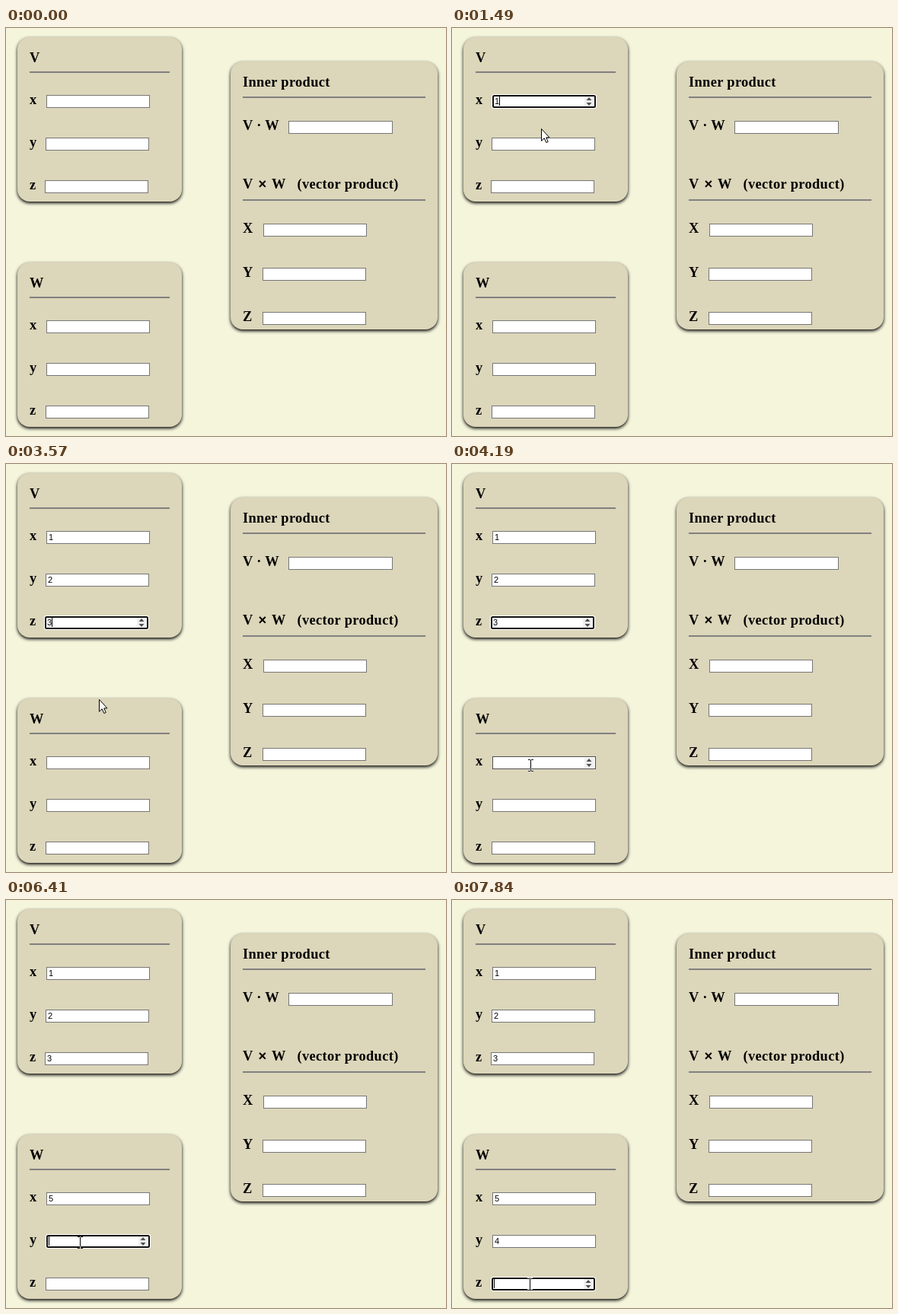
Animation of 578 by 536 pixels, one loop 8000 ms. Source, as an HTML page:

```html
<!DOCTYPE html>
<html lang="en">
<head>
<meta charset="utf-8">
<title>Vector products</title>
<style>
html, body { margin: 0; width: 100%; height: 100%; overflow: hidden; background: #f5f5dc; }
.card { position: absolute; left: 15px; width: 216px; height: 216px; border-radius: 16px;
  background: #dcd6ba; box-shadow: 0 2px 4px #000; }
svg { position: absolute; left: 0; top: 0; }
#labels { font: bold 18.4px "Liberation Serif", "Times New Roman", serif; letter-spacing: .35px; }
#labels .times { font-family: "Liberation Sans", Arial, sans-serif; }
#fields { font: 11px "Liberation Sans", Arial, sans-serif; }
#beam { mix-blend-mode: difference; }
</style>
</head>
<body>
<div class="card" style="top:12px"></div>
<div class="card" style="top:308px"></div>
<div class="card" style="left:295px;top:44px;width:272px;height:352px"></div>
<svg width="578" height="536">
  <path d="M31 58H215M31 354H215M311 91H551M311 226H551" stroke="#808080" stroke-width="2"/>
  <g id="labels">
    <text x="31" y="45">V</text>
    <text x="31" y="341">W</text>
    <text x="311" y="77">Inner product</text>
    <text x="311" y="134">V · W</text>
    <text x="311" y="211">V</text>
    <text x="331.5" y="211" class="times">×</text>
    <text x="349" y="211">W</text>
    <text x="382.5" y="211">(vector product)</text>
  </g>
  <g id="fields"></g>
  <path id="arrow" d="M.5 .5V16.3L4.2 12.8 6.8 18.5 9.2 17.5 6.7 11.9H11Z" fill="#fff" stroke="#000"/>
  <path id="beam" d="M-3 -7.5H0M1 -7.5H4M.5 -7V7M-3 7.5H0M1 7.5H4" fill="none" stroke="#fff"/>
</svg>
<script>
const LOOP = 8000, BLINK = 525;
const $ = id => document.getElementById(id);

// Each input: value typed, time of the click, time of the key
const typing = [
  [1, 1120, 1440], [2, 1940, 2250], [3, 2760, 3300],
  [5, 4340, 5640], [4, 6210, 6850], ['', 7670, LOOP]
];

// Mouse moves: start, end, x and y reached
const moves = [
  [350, 970, 113, 95], [1440, 1490, 117, 132], [1640, 1790, 122, 152],
  [2250, 2450, 137, 227], [2450, 2610, 137, 210], [3300, 3900, 104, 429],
  [3900, 4170, 103, 396], [5740, 5790, 103, 413], [5840, 5890, 97, 450], [6850, 7570, 102, 504]
];

const inputs = typing.map(([value, click, key], i) => {
  const card = Math.floor(i / 3), row = i % 3;
  return { value, click, key, w: 136, x: Math.floor(53.2 + .6 * card - .7 * row), y: 88 + 296 * card + 56 * row };
});
const results = [0, 1, 2].map(i => ({ x: Math.floor(338.2 - .5 * i), y: 257 + 58 * i, w: 136 }));
const fields = [...inputs, ...results, { x: 371, y: 122, w: 137 }];

const label = (s, x, y) => `<text x="${x}" y="${y}">${s}</text>`;
$('labels').innerHTML += inputs.map((f, i) => label('xyz'[i % 3], 31, f.y + 12)).join('') +
  results.map((f, i) => label('XYZ'[i], 311, f.y + 12)).join('');

function mouseAt(t) {
  let x = 512, y = 511;
  for (const [from, to, toX, toY] of moves) {
    const k = Math.min(1, Math.max(0, (t - from) / (to - from)));
    x += (toX - x) * k;
    y += (toY - y) * k;
  }
  return [Math.round(x), Math.round(y)];
}

const rect = (x, y, w, h, more = '') => `<rect x="${x}" y="${y}" width="${w}" height="${h}" ${more}/>`;

const spinner = (x, y) => rect(x + 121, y + 2, 13, 13, 'fill="#f0f0f0"') +
  `<path d="M${x + 123.5} ${y + 7}h7l-3.5 -4zM${x + 123.5} ${y + 10}h7l-3.5 4z" fill="#505050"/>`;

function drawField({ x, y, w, value, click, key }, t, focused, hovered) {
  const typed = t >= key;
  let out = focused
    ? rect(x - 1, y - 1, w + 2, 19, 'rx="3" fill="#fff"') +
      rect(x + 1, y + 1, w - 2, 15, 'rx="1.5" fill="#fff" stroke="#101010" stroke-width="2"')
    : rect(x + .5, y + .5, w - 1, 16, `fill="#fff" stroke="${hovered ? '#4f4f4f' : '#767676'}"`);
  if (click && (focused || hovered)) out += spinner(x, y);
  if (typed) out += label(value, x + 3, y + 12);
  const since = t - (typed ? key : click);
  if (focused && since % (2 * BLINK) < BLINK) out += rect(x + (typed ? 9 : 3), y + 2, 1, 12);
  return out;
}

function place(id, shown, x, y) {
  $(id).setAttribute('transform', `translate(${x} ${y})`);
  $(id).setAttribute('visibility', shown ? 'visible' : 'hidden');
}

function draw() {
  const t = performance.now() % LOOP, [mx, my] = mouseAt(t), onStage = t >= moves[0][0];
  const focus = inputs.findLast(f => t >= f.click);
  const hover = onStage && fields.find(f => mx >= f.x && mx < f.x + f.w && my >= f.y && my < f.y + 17);
  $('fields').innerHTML = fields.map(f => drawField(f, t, f === focus, f === hover)).join('');
  place('arrow', onStage && !hover, mx, my);
  place('beam', hover, mx, my);
  requestAnimationFrame(draw);
}
draw();
</script>
</body>
</html>
```
